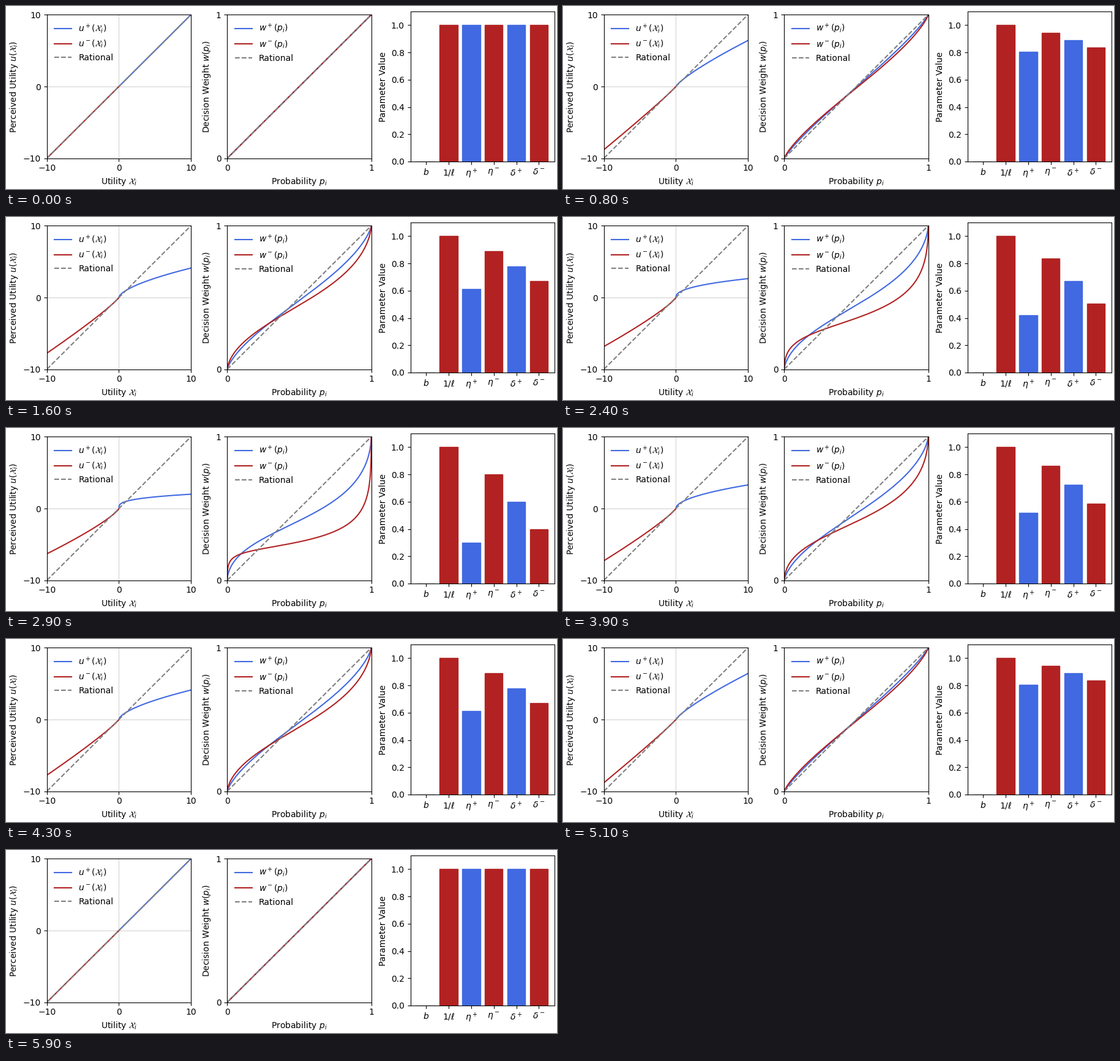
Animation of 900x300 px, one loop 6 s. Source, as a matplotlib script:

```python
import numpy as np
import matplotlib.pyplot as plt
from matplotlib.animation import FuncAnimation

W, H, DPI = 900, 300, 100
FRAMES, INTERVAL = 60, 100
BLUE, RED, GRAY = "royalblue", "firebrick", "gray"

# Parameter values at rest and at full distortion
NAMES = ["$b$", r"$1/\ell$", r"$\eta^+$", r"$\eta^-$", r"$\delta^+$", r"$\delta^-$"]
START = np.array([0, 1, 1, 1, 1, 1.0])
END = np.array([0, 1, 0.3, 0.8, 0.6, 0.4])

gain = np.linspace(0, 10, 1001)
prob = np.linspace(0, 1, 1001)


def weight(p, d):
    """Inverse-S probability weighting."""
    return p**d / (p**d + (1 - p)**d) ** (1 / d)


def add_axes(left, top, width, height):
    """Axes placed in pixels from the top left corner."""
    return fig.add_axes([left / W, 1 - (top + height) / H, width / W, height / H])


def add_curves(ax, symbol, lo, hi):
    up, = ax.plot([], [], color=BLUE, label=f"${symbol.format('+')}$")
    down, = ax.plot([], [], color=RED, label=f"${symbol.format('-')}$")
    ax.plot([lo, hi], [lo, hi], "--", color=GRAY, label="Rational")
    ax.set(xlim=(lo, hi), ylim=(lo, hi))
    ax.legend(loc="upper left", frameon=False)
    return up, down


fig = plt.figure(figsize=(W / DPI, H / DPI), dpi=DPI)

ax_u = add_axes(66.8, 14.4, 235.2, 235.2)
ax_u.axhline(0, color="lightgray", lw=0.8, zorder=0)
ax_u.axvline(0, color="lightgray", lw=0.8, zorder=0)
u_up, u_down = add_curves(ax_u, r"u^{}(\mathcal{{X}}_i)", -10, 10)
ax_u.set(xticks=[-10, 0, 10], yticks=[-10, 0, 10],
         xlabel=r"Utility $\mathcal{X}_i$",
         ylabel=r"Perceived Utility $u(\mathcal{X}_i)$")

ax_w = add_axes(361.4, 14.4, 235.2, 235.2)
w_up, w_down = add_curves(ax_w, "w^{}(p_i)", 0, 1)
ax_w.set(xticks=[0, 1], yticks=[0, 1],
         xlabel="Probability $p_i$", ylabel="Decision Weight $w(p_i)$")

ax_p = add_axes(660.63, 9, 235.2, 246)
bars = ax_p.bar(NAMES, START)
for bar, color in zip(bars, [GRAY, RED, BLUE, RED, BLUE, RED]):
    bar.set_color(color)
ax_p.set(ylim=(0, 1.1), ylabel="Parameter Value")


def update(i):
    # Linear ramp there and back, holding two frames at each end
    t = min(i, FRAMES - 1 - i) / (FRAMES // 2 - 1)
    values = START + (END - START) * t
    bias, inv_loss, eta_up, eta_down, delta_up, delta_down = values
    u_up.set_data(gain, gain**eta_up + bias)
    u_down.set_data(-gain, bias - gain**eta_down / inv_loss)
    w_up.set_data(prob, weight(prob, delta_up))
    w_down.set_data(prob, weight(prob, delta_down))
    for bar, value in zip(bars, values):
        bar.set_height(value)
    return u_up, u_down, w_up, w_down, *bars


anim = FuncAnimation(fig, update, frames=FRAMES, interval=INTERVAL,
                     repeat=True, repeat_delay=0, blit=False)
plt.show()
```
